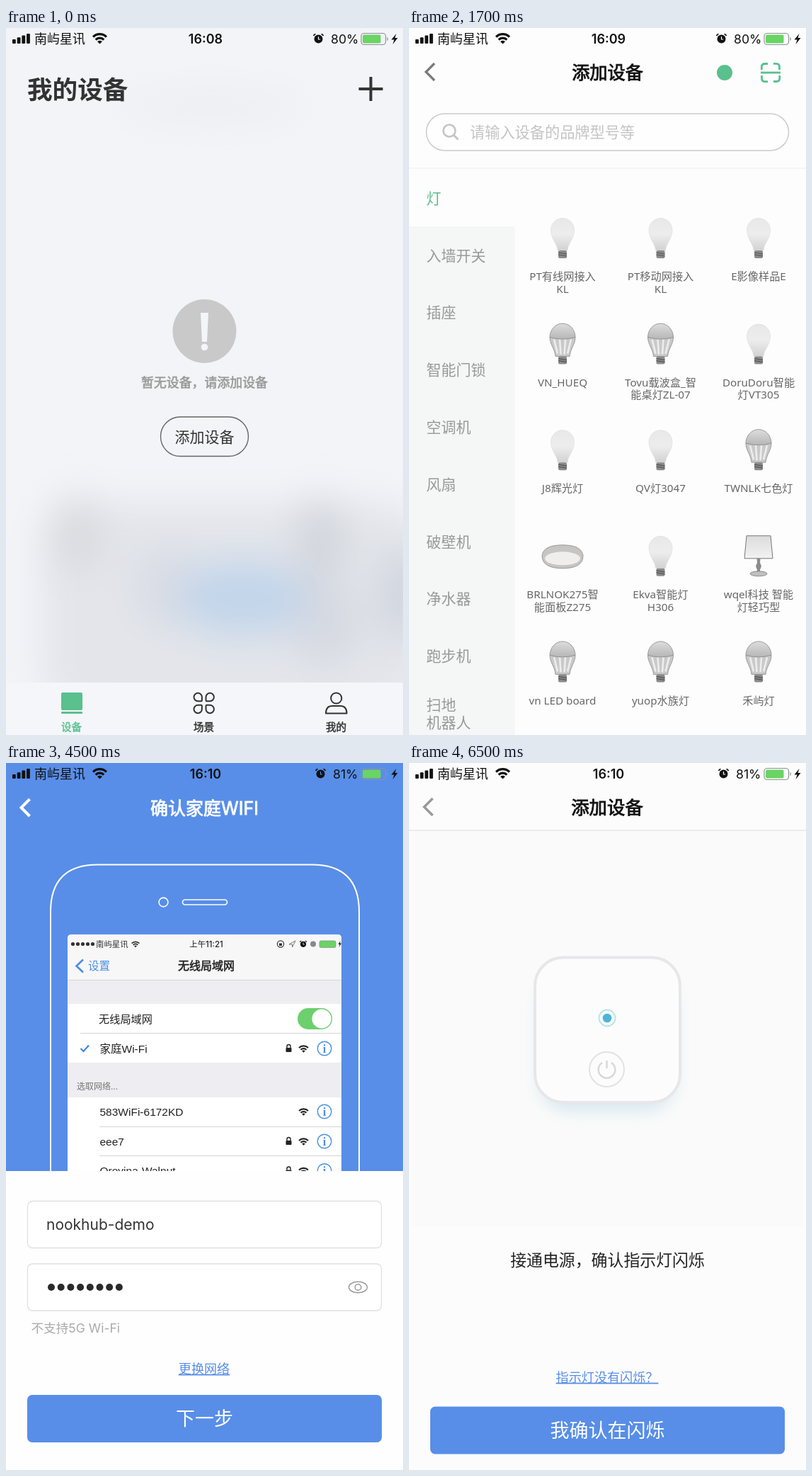
Write an HTML page that moves like this. It is 561 px wide and 998 px high and loops after 8 s.

```html
<!DOCTYPE html>
<html lang="zh-CN">
<head>
<meta charset="utf-8">
<style>
html, body { margin: 0; width: 100%; height: 100%; overflow: hidden; background: #fff; }
svg { display: block; width: 100%; height: 100%; }
text { font-family: "Noto Sans CJK SC", "Noto Sans CJK", sans-serif; white-space: pre; }
.ui { font-family: Inter, "Noto Sans CJK SC", sans-serif; }
.item { font-family: "Noto Sans", "Noto Sans CJK SC", sans-serif; }
.row { font-family: "Liberation Sans", "Noto Sans CJK SC", sans-serif; }
</style>
</head>
<body>
<svg id="stage" viewBox="0 0 561 998" preserveAspectRatio="none"></svg>
<script>
const GREEN = '#5ac08d', BLUE = '#588ee8', CARRIER = '南屿星讯';
const W = 561, H = 998;

const stroke = (color, width) => `stroke="${color}" stroke-width="${width}"`;
// y is the vertical middle of the glyphs
const text = (x, y, s, size, fill, attrs = '') =>
  `<text x="${x}" y="${y + size * .37}" font-size="${size}" fill="${fill}" ${attrs}>${s}</text>`;
const mid = (x, y, s, size, fill, attrs = '') => text(x, y, s, size, fill, 'text-anchor="middle" ' + attrs);
// Medium weight: regular glyphs with a thin outline
const medium = (x, y, s, size, fill, attrs = '') => mid(x, y, s, size, fill, stroke(fill, size * .034) + attrs);
const rect = (x, y, w, h, fill, attrs = '') =>
  `<rect x="${x}" y="${y}" width="${w}" height="${h}" fill="${fill}" ${attrs}/>`;
const circle = (x, y, r, fill, attrs = '') => `<circle cx="${x}" cy="${y}" r="${r}" fill="${fill}" ${attrs}/>`;
const oval = (x, y, rx, ry, fill, attrs = '') =>
  `<ellipse cx="${x}" cy="${y}" rx="${rx}" ry="${ry}" fill="${fill}" ${attrs}/>`;
const fillPath = (d, fill, attrs = '') => `<path d="${d}" fill="${fill}" ${attrs}/>`;
const line = (d, color, width, attrs = '') => fillPath(d, 'none', stroke(color, width) + attrs);
const at = (x, y, s, k = 1) => `<g transform="translate(${x} ${y}) scale(${k})">${s}</g>`;
const fourWays = s => [0, 90, 180, 270].map(a => `<g transform="rotate(${a})">${s}</g>`).join('');
const range = n => [...Array(n).keys()];
const gradient = (id, y1, y2, stops) =>
  `<linearGradient id="${id}" gradientUnits="userSpaceOnUse" x1="0" x2="0" y1="${y1}" y2="${y2}">` +
  stops.map(([o, c, a = 1]) => `<stop offset="${o}" stop-color="${c}" stop-opacity="${a}"/>`).join('') +
  '</linearGradient>';

const wifi = (x, y, k, c) => at(x, y,
  line('M-9-9A12.7 12.7 0 0 1 9-9M-5.5-5.2A7.6 7.6 0 0 1 5.5-5.2', c, 3) +
  fillPath('M0 .5L-3.2-2.7A4.5 4.5 0 0 1 3.2-2.7Z', c), k);
const alarm = (x, y, k, hand) => at(x, y,
  circle(0, .5, 6, '#111') + line('M-6.8-3.8Q-6.500-6-4-6.500M6.800-3.800Q6.500-6 4-6.500', '#111', 1.6) +
  line('M0-3V1H2.6', hand, 1.2), k);
const back = (x, y, c, w) => line(`M${x + 12} ${y - 12}L${x} ${y}L${x + 12} ${y + 12}`, c, w);

function statusBar(time, charge, dx, bg) {
  const bars = range(4).map(i => rect(9 + i * 6.7, 16 - i * 2.7, 4.8, 6 + i * 2.7, '#111', 'rx="1"')).join('');
  return bars + text(40, 15.5, CARRIER, 18, '#111') + wifi(132.5, 22, 1.05, '#111') +
    mid(282, 15.5, time, 18, '#111', 'class="ui" font-weight="600"') +
    alarm(441.5 + dx, 15, 1, bg) +
    text(459 + dx, 15.5, charge, 17.6, '#111', 'class="ui"') +
    rect(502, 7.5, 34.5, 16, 'none', 'rx="4" ' + stroke('#8d9295', 1.2)) +
    rect(504, 9.5, 25.5, 12, '#6ad465', 'rx="2"') +
    fillPath('M538.5 12.5q3 3 0 6z', '#8d9295') +
    fillPath('M551.5 8l-7 8.5h4l-2 6.5 7-9h-4z', '#111');
}

const button = (y, s) => rect(30, y, 501, 67, BLUE, 'rx="7"') + mid(280.5, y + 33.5, s, 27, '#fff');
const link = (y, s) => mid(280, y, s, 18.1, BLUE, 'text-decoration="underline"');

function homeScreen() {
  const blobs = [
    [290, 110, 130, 25, '#eceef2'], [100, 715, 40, 55, '#d9dbdf'], [445, 725, 35, 65, '#d2d5dc'],
    [230, 790, 50, 60, '#d9dde5'], [450, 840, 50, 60, '#d6d9e1'], [565, 800, 40, 70, '#d0d5df'],
    [335, 805, 95, 55, '#c3d6ea']
  ].map(b => oval(...b)).join('');
  const tile = line('M-2.8-4V-8.5A5.7 5.7 0 1 0-8.5-2.8H-4Q-2.8-2.8-2.8-4Z', '#333', 2);
  return rect(0, 0, W, H, '#f3f4f8') +
    `<g filter="url(#haze)">${rect(50, 670, 540, 300, '#e3e5ea', 'rx="60"') + blobs}</g>` +
    rect(0, 924, W, 74, '#f5f6fa') + statusBar('16:08', '80%', 0, '#f4f5f9') +
    text(30, 87, '我的设备', 35.6, '#333', 'font-weight="700"') +
    line('M498.5 86h34M515.5 69v34', '#333', 4) +
    circle(280.5, 428, 45, '#c9c9c9') +
    fillPath('M275 402h11l-2 41h-7z', '#f4f5f8') + circle(280.5, 450.5, 4.8, '#f4f5f8') +
    medium(280.5, 500, '暂无设备，请添加设备', 17.9, '#999') +
    rect(218.5, 549, 124, 55.5, 'none', 'rx="27.7" ' + stroke('#666', 1.4)) +
    mid(280.5, 577, '添加设备', 21, '#333') +
    rect(78, 938, 30, 25, GREEN, 'rx="2"') + rect(78, 965, 30, 3, GREEN, 'rx="1"') +
    at(279.7, 953, fourWays(tile)) +
    circle(466.7, 946, 7.6, 'none', stroke('#333', 2)) +
    line('M452 967.5Q452 957 461 957H472.5Q481.5 957 481.5 967.5Z', '#333', 2, ' stroke-linejoin="round"') +
    [['设备', 92.5, GREEN], ['场景', 279.5, '#333'], ['我的', 466.5, '#333']]
      .map(([s, x, c]) => medium(x, 987, s, 14.6, c)).join('');
}

// Device pictures, drawn around their own centre
const thread = rect(-6, 18, 12, 11, '#8b8b8b', 'rx="2"') + line('M-6 21l12 2M-6 24l12 2', '#555', 1.2);
const icons = {
  bulb: fillPath('M-7 18C-7 9-16.5 2-16.5-11A16.5 16.5 0 0 1 16.5-11C16.5 2 7 9 7 18Z',
    'url(#glass)', stroke('#dedede', .7)) + thread,
  led: fillPath('M-18-9C-18 1-11 7-10 18H10C11 7 18 1 18-9Z', '#c9c9c9', stroke('#888', .8)) +
    line('M-12-6L-7 14M-4-6L-2.500 15M4-6L2.500 15M12-6L7 14', '#ededed', 2.6) +
    fillPath('M-18-9A18 19.5 0 0 1 18-9Q0-4-18-9Z', 'url(#dome)', stroke('#888', .8)) + thread,
  ceiling: fillPath('M-29 0Q-27-15 0-15T29 0Q29 18 0 18T-29 0Z', '#c6c5c3', stroke('#888', .8)) +
    oval(0, 4, 25, 9.5, '#f0eeec'),
  table: fillPath('M-17-28H17L20 4H-20Z', 'url(#shadeCloth)', stroke('#777', 1)) +
    fillPath('M-2.5 4H2.5L2 10 4 15 2 20V24H-2V20L-4 15-2 10Z', '#8c8c8c') +
    oval(0, 25.5, 12, 3.5, '#c0c0c0', stroke('#777', .8))
};

const devices = [
  ['bulb', 'PT有线网接入', 'KL'], ['bulb', 'PT移动网接入', 'KL'], ['bulb', 'E影像样品E'],
  ['led', 'VN_HUEQ'], ['led', 'Tovu载波盒_智', '能桌灯ZL-07'], ['bulb', 'DoruDoru智能', '灯VT305'],
  ['bulb', 'J8辉光灯'], ['bulb', 'QV灯3047'], ['led', 'TWNLK七色灯'],
  ['ceiling', 'BRLNOK275智', '能面板Z275'], ['bulb', 'Ekva智能灯', 'H306'], ['table', 'wqel科技 智能', '灯轻巧型'],
  ['led', 'vn LED board'], ['led', 'yuop水族灯'], ['led', '禾屿灯']
];
const kinds = ['灯', '入墙开关', '插座', '智能门锁', '空调机', '风扇', '破壁机', '净水器', '跑步机'];

function listScreen() {
  const items = devices.map(([icon, ...lines], i) => {
    const x = 217 + i % 3 * 138.5, row = Math.floor(i / 3) * 149.6;
    return at(x, 296 + row, icons[icon]) +
      lines.map((s, n) => mid(x, 350.5 + row + n * 17.6, s, 15.2, '#666', 'class="item"')).join('');
  }).join('');
  const scanCorner = line('M-12.7-4V-8Q-12.7-12.5-8-12.5H-4', GREEN, 2.8);
  return rect(0, 0, W, H, '#fdfdfd') + rect(0, 280, 149.5, 718, '#f5f6f6') +
    statusBar('16:09', '80%', 0, '#fdfdfd') + back(24, 62, '#7a7a7a', 3.2) +
    medium(280.5, 63, '添加设备', 25.2, '#111') +
    circle(446, 63, 11, GREEN) +
    at(511, 63, fourWays(scanCorner) + line('M-14 0H14', GREEN, 2.8)) +
    rect(24.5, 121, 512, 52, '#fefefe', 'rx="26" ' + stroke('#ccc', 1.5)) +
    circle(57, 145, 8.5, 'none', stroke('#c4c4c4', 2.6)) + line('M63 151l6.5 6.5', '#c4c4c4', 3) +
    text(86, 147, '请输入设备的品牌型号等', 21.2, '#c4c4c4') +
    rect(0, 197.5, W, 1, '#eee') +
    kinds.map((s, i) => text(24.5, 240 + i * 80.8, s, 21, i ? '#999' : GREEN)).join('') +
    text(24.5, 955, '扫地', 21, '#999') + text(24.5, 980, '机器人', 21, '#999') + items;
}

function scanScreen() {
  const cell = 410 / 48;
  const mesh = range(49).map(i => `M${76 + i * cell} 206V557`).join('') +
    range(42).map(i => `M76 ${557 - i * cell}H486`).join('');
  return rect(0, 0, W, H, '#000') + rect(504, 9.5, 26, 11.5, '#4cd964', 'rx="1.5"') +
    line('M31 51L19 63L31 75', '#fff', 2) +
    medium(280.5, 64, '扫描二维码', 27, '#fff') +
    line(mesh, 'url(#mesh)', 1.5) + rect(76, 506, 410, 52, 'url(#glow)') +
    at(280.5, 409.5, fourWays(line('M-203.5-137.5V-203.5H-137.5', '#fff', 4.5))) +
    mid(280.5, 667, '请将设备二维码放置在识别框中', 22.8, '#eee');
}

function wifiScreen() {
  const lock = y => rect(395.5, y - 1, 8, 6, '#222', 'rx="1"') + line(`M397 ${y - 1}v-2a2.5 2.5 0 0 1 5 0v2`, '#222', 1.4);
  const network = (y, s, locked) => text(132.5, y, s, 15.5, '#222', 'class="row"') +
    (locked ? lock(y) : '') + wifi(420.5, y + 5.5, .72, '#222') +
    circle(450, y, 9.8, 'none', stroke('#4a90dc', 1.4)) +
    mid(450, y, 'i', 16, '#4a90dc', 'style="font-family:\'Liberation Serif\',serif" font-weight="700"');
  const screen = rect(87, 242, 387, 340, '#fff', 'rx="5"') +
    rect(87, 242, 387, 64, '#f7f7f8', 'rx="5"') + rect(87, 306, 387, 34, '#eeeef2') +
    rect(87, 423, 387, 49, '#eeeef2') +
    line('M87 306.5H474M105 381.5H474M132 513.5H474M132 554.5H474', '#d5d5d9', 1) +
    range(5).map(i => circle(94.5 + i * 7, 255.5, 2.6, '#333')).join('') +
    text(127, 255.5, CARRIER, 11.4, '#333') + wifi(183, 260, .6, '#333') +
    mid(283, 255.5, '上午11:21', 11.4, '#222', 'class="ui" font-weight="500"') +
    circle(388, 255.5, 4.6, 'none', stroke('#333', 1.2)) + rect(386, 254.5, 4, 3.5, '#333') +
    line('M400 256l9-5-4.5 9v-4z', '#777', 1) + alarm(420, 255.5, .68, '#f7f7f8') +
    circle(434, 255.5, 4, '#888') + rect(443, 251, 23, 9.5, '#6ad465', 'rx="2" ' + stroke('#888', .7)) +
    fillPath('M472.5 251l-3 5h2l-1 4 3.5-5.5h-2z', '#222') +
    line('M109 277.5L99.5 286.5L109 295.5', '#4a8be6', 2.6) + text(116, 286.5, '设置', 15.6, '#4a8be6') +
    medium(283, 286, '无线局域网', 16, '#222') +
    text(131, 361.5, '无线局域网', 15.2, '#222') +
    rect(412, 346, 49, 30, '#6cd06d', 'rx="15"') + circle(446, 361, 13.6, '#fff') +
    line('M105.5 403l4 4 7.5-8.5', '#3f86e0', 2.2) +
    network(403, '家庭Wi-Fi', 1) + text(100, 457, '选取网络...', 12, '#777') +
    network(492, '583WiFi-6172KD') + network(534, 'eee7', 1) + network(575.5, 'Orovina-Walnut', 1);
  return rect(0, 0, W, H, BLUE) + statusBar('16:10', '81%', 3, BLUE) + back(21.5, 63, '#fff', 4) +
    medium(280.5, 64, '确认家庭WIFI', 25, '#fff', ' class="ui"') +
    line('M63 580V210Q63 143.5 130 143.5H432Q499 143.5 499 210V580', '#fff', 2) +
    circle(222.5, 196.5, 6.4, 'none', stroke('#fff', 1.6)) +
    rect(249.5, 193, 63, 7, 'none', 'rx="3.5" ' + stroke('#fff', 1.6)) + screen +
    rect(0, 576, W, 422, '#fefefe') +
    [618.5, 707].map(y => rect(30.5, y, 500, 66, '#fff', 'rx="7" ' + stroke('#e0e0e0', 1.3))).join('') +
    text(57, 651.5, 'nookhub-demo', 21, '#333', 'class="ui"') +
    range(8).map(i => circle(64 + i * 13.7, 740, 5, '#2a2a2a')).join('') +
    oval(497.5, 740, 13, 7.8, 'none', stroke('#999', 1.5)) + circle(497.5, 740, 4.3, 'none', stroke('#999', 1.5)) +
    text(35.5, 797, '不支持5G Wi-Fi', 17.6, '#aaa', 'class="ui"') +
    link(855, '更换网络') + button(892, '下一步');
}

function confirmScreen() {
  return rect(0, 0, W, H, '#fcfcfc') + rect(4, 96, 553, 559, '#fafafa') +
    statusBar('16:10', '81%', 3, '#fcfcfc') + back(21.5, 62, '#999', 3.5) +
    medium(280, 63, '添加设备', 25.4, '#111') +
    rect(0, 94.5, W, 1.2, '#e2e2e2') +
    rect(184, 300, 193, 192, '#d9e8ef', 'rx="42" filter="url(#shade)"') +
    rect(178, 274.5, 205, 204.5, '#fcfcfc', 'rx="40" ' + stroke('#e7e7e9', 4)) +
    circle(280, 360, 11.5, '#f4fbfd', stroke('#b5e2ec', 1.8)) + circle(280, 360, 6.3, '#4eb4d3') +
    circle(279.5, 432.5, 24.5, 'none', stroke('#e2e2e2', 2)) +
    line('M273 423A11.8 11.8 0 1 0 286 423M279.5 420V431', '#d8d8d8', 2.5) +
    mid(280.5, 702, '接通电源，确认指示灯闪烁', 22.9, '#222') +
    link(867, '指示灯没有闪烁？') + button(908.5, '我确认在闪烁');
}

const defs = '<defs>' +
  gradient('glass', -28, 18, [[0, '#e8e8e8'], [.5, '#ededed'], [1, '#d2d2d2']]) +
  gradient('shadeCloth', -28, 4, [[0, '#dcdcdc'], [1, '#f2f2f2']]) +
  gradient('dome', -28, -4, [[0, '#dcdcdc'], [1, '#b2b2b2']]) +
  gradient('mesh', 206, 557, [[0, '#151a19', .6], [.5, '#1d2827'], [.85, '#2a3d3c'], [1, '#4a615e']]) +
  gradient('glow', 506, 558, [[0, '#35505a', 0], [.5, '#35555c', .3], [.85, '#64807c', .55], [1, '#a9bfb7', .95]]) +
  '<filter id="haze" filterUnits="userSpaceOnUse" x="-100" y="0" width="800" height="1100"><feGaussianBlur stdDeviation="26"/></filter>' +
  '<filter id="shade" x="-30%" y="-30%" width="160%" height="160%"><feGaussianBlur stdDeviation="11"/></filter></defs>';

const stage = document.getElementById('stage');
const builders = [homeScreen, listScreen, scanScreen, wifiScreen, confirmScreen];
stage.innerHTML = defs + builders.map(build => `<g class="screen">${build()}</g>`).join('');
const screens = document.querySelectorAll('.screen');
const starts = [0, 500, 2500, 4500, 6500];
const begin = performance.now();

function show(now) {
  const t = Math.max(0, now - begin) % 8000;
  const current = starts.filter(s => s <= t).length - 1;
  screens.forEach((g, i) => g.style.display = i === current ? '' : 'none');
  requestAnimationFrame(show);
}
show(begin);
</script>
</body>
</html>
```
